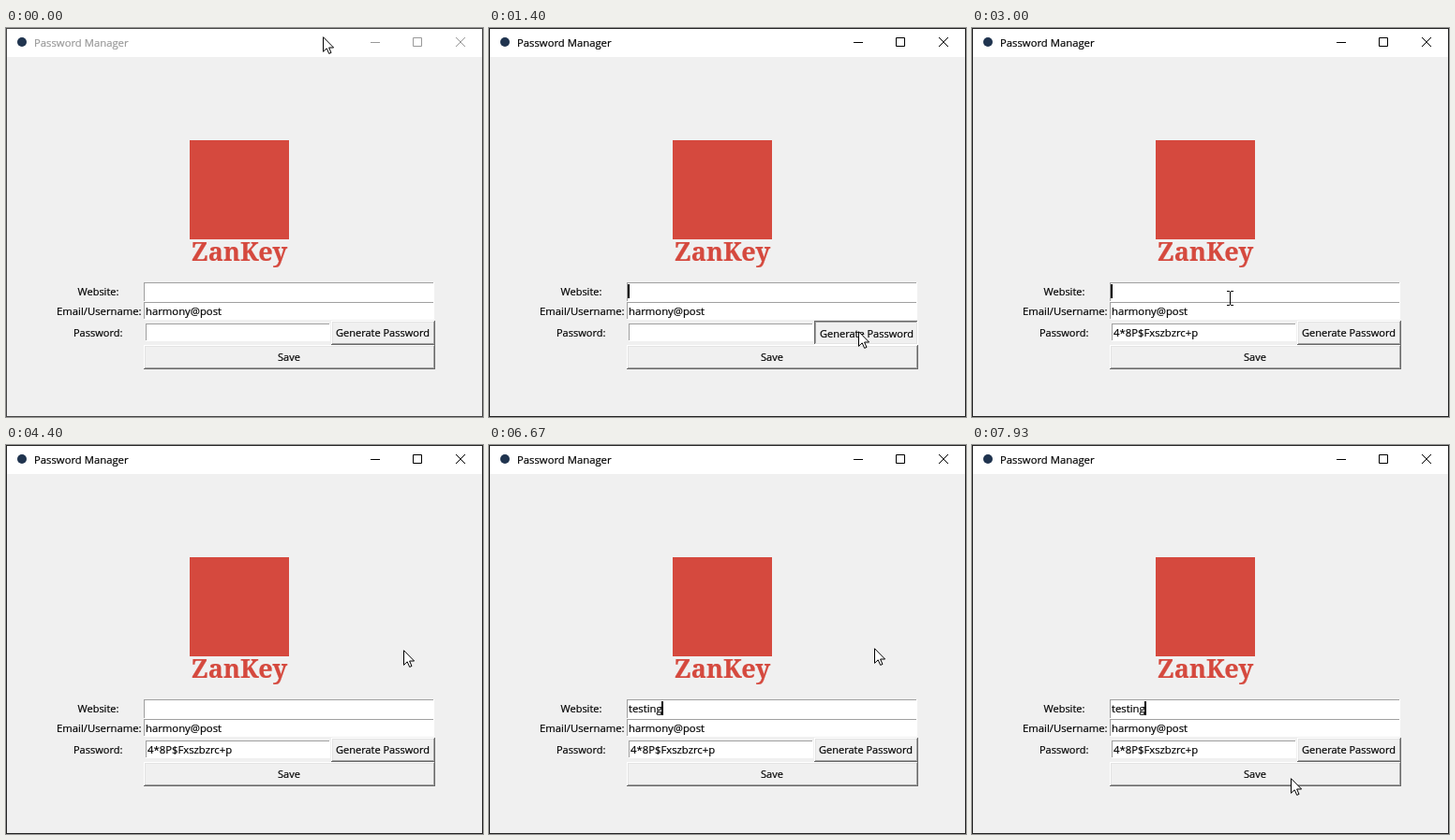
Write an HTML page that moves like this. It is 509 px wide and 416 px high and loops after 8000 ms.

```html
<!DOCTYPE html>
<html lang="en">
<head>
<meta charset="utf-8">
<title>Password Manager</title>
<style>
  html, body { margin: 0; width: 100%; height: 100%; overflow: hidden; background: #f0f0f0; }
  svg { display: block; width: 509px; height: 416px; }
  text { font: 11px "Open Sans", "Noto Sans", sans-serif; white-space: pre;
         fill: currentColor; stroke: currentColor; stroke-width: .2px; }
  .wide { font-size: 11.3px; }
  .brand { font: bold 27px "Noto Serif", serif; color: #d5493e; }
</style>
</head>
<body>
<svg viewBox="0 0 509 416">
  <rect width="509" height="416" fill="#f0f0f0"/>
  <rect width="509" height="31" fill="#fff"/>
  <rect id="frame" x=".5" y=".5" width="508" height="415" fill="none"/>
  <circle cx="17" cy="15" r="5" fill="#20344f"/>
  <g id="titlebar">
    <text class="wide" x="30" y="20">Password Manager</text>
    <path fill="none" stroke="currentColor" d="M389 15.5h10M434.5 10.5h9v9h-9zM480 10l10 10M490 10l-10 10"/>
  </g>

  <rect x="196" y="120" width="106" height="106" fill="#d5493e"/>
  <text class="brand" x="249" y="249" text-anchor="middle">ZanKey</text>

  <text x="76.5" y="286">Website:</text>
  <text x="54" y="307" class="wide">Email/Username:</text>
  <text x="72" y="330">Password:</text>
  <g id="widgets"></g>
  <text id="website" class="wide" x="149" y="286"></text>
  <text class="wide" x="149" y="307">harmony@post</text>
  <text id="password" class="wide" x="151" y="330"></text>
  <rect id="caret" y="274" width="2" height="15"/>

  <path id="arrow" fill="#fff" stroke="#000" d="M.5 .7V16.3L4.2 12.8L6.7 18.4L9 17.4L6.6 12H11.6Z"/>
  <path id="beam" fill="none" stroke="#000" d="M-3 -7.5h3M1 -7.5h3M.5 -7V7M-3 7.5h3M1 7.5h3"/>
</svg>
<script>
const $ = id => document.getElementById(id);
const LOOP = 8000, FPS = 15;
const FOCUS = 200, BLINK = 900, CARET_ON = 600;
const TYPE_START = 4860, KEY_GAP = 155;
const presses = [1330, 2260], HOLD = 133;
const passwords = ["", "AU9OL&g$6Vj8ZQ", "4*8P$Fxszbzrc+p"];

// x, y, width, height
const entries = [[147, 272, 310, 21], [147, 293, 310, 19], [149, 316, 197, 19]];

// from, to (ms), target x, y
const home = [338, 9];
const moves = [
  [200, 650, 545, 340], [800, 1267, 394, 324],
  [2467, 3000, 275, 289], [3200, 3533, 424, 219],
  [6600, 6667, 411, 217], [6667, 6933, 380, 203],
  [7133, 7600, 352, 375], [7600, 7933, 340, 356]
];

const box = (x, y, w, h, fill) => `<rect x="${x}" y="${y}" width="${w}" height="${h}" fill="${fill}"/>`;

// Two-tone edge: one colour on the top and left, the other on the bottom and right
const bevel = (x, y, w, h, lit, shade) => box(x, y, w, h, shade) + box(x, y, w - 1, h - 1, lit);

const entry = ([x, y, w, h]) =>
  bevel(x, y, w, h, "#a0a0a0", "#fff") + box(x + 1, y + 1, w - 2, h - 2, "#fff");

function button(x, y, w, h, label, down) {
  const outer = ["#fff", "#696969"], inner = ["#e3e3e3", "#a0a0a0"];
  if (down) [outer, inner].forEach(pair => pair.reverse());
  const shift = down ? 1 : 0;
  return bevel(x, y, w, h, ...outer) + bevel(x + 1, y + 1, w - 2, h - 2, ...inner) +
    box(x + 2, y + 2, w - 4, h - 4, "#f0f0f0") +
    `<text x="${x + w / 2 - .5 + shift}" y="${y + 17 + shift}" text-anchor="middle">${label}</text>`;
}

const clamp = (v, low, high) => Math.min(high, Math.max(low, v));

function pointer(t) {
  let [x, y] = home;
  for (const [from, to, nextX, nextY] of moves) {
    const k = clamp((t - from) / (to - from), 0, 1), ease = k * k * (3 - 2 * k);
    x += (nextX - x) * ease;
    y += (nextY - y) * ease;
  }
  return [Math.round(x), Math.round(y)];
}

const show = (id, on) => $(id).style.display = on ? "" : "none";

let wasDown;
function draw(t) {
  const focused = t >= FOCUS;
  $("frame").setAttribute("stroke", focused ? "#222" : "#444");
  $("titlebar").style.color = focused ? "#000" : "#999";

  const down = presses.some(p => t >= p && t < p + HOLD);
  if (down !== wasDown) {
    $("widgets").innerHTML = entries.map(entry).join("") +
      button(347, 313, 111, 26, "Generate Password", down) +
      button(147, 339, 311, 26, "Save", false);
    wasDown = down;
  }

  const typed = "testing".slice(0, clamp(Math.floor((t - TYPE_START) / KEY_GAP) + 1, 0, 7));
  $("website").textContent = typed;
  $("password").textContent = passwords[presses.filter(p => t >= p + HOLD).length];
  const width = typed ? $("website").getComputedTextLength() : 0;
  $("caret").setAttribute("x", 148 + Math.round(width));
  show("caret", focused && (t - FOCUS) % BLINK < CARET_ON);

  const [x, y] = pointer(t);
  const overEntry = entries.some(([ex, ey, w, h]) => x >= ex && x < ex + w && y >= ey && y < ey + h);
  show("arrow", !overEntry);
  show("beam", overEntry);
  for (const id of ["arrow", "beam"]) $(id).setAttribute("transform", `translate(${x} ${y})`);
}

let start;
function tick(now) {
  start ??= now;
  const t = (now - start) % LOOP;
  draw(Math.floor(t * FPS / 1000 + .05) * 1000 / FPS);
  requestAnimationFrame(tick);
}
draw(0);
requestAnimationFrame(tick);
</script>
</body>
</html>
```
